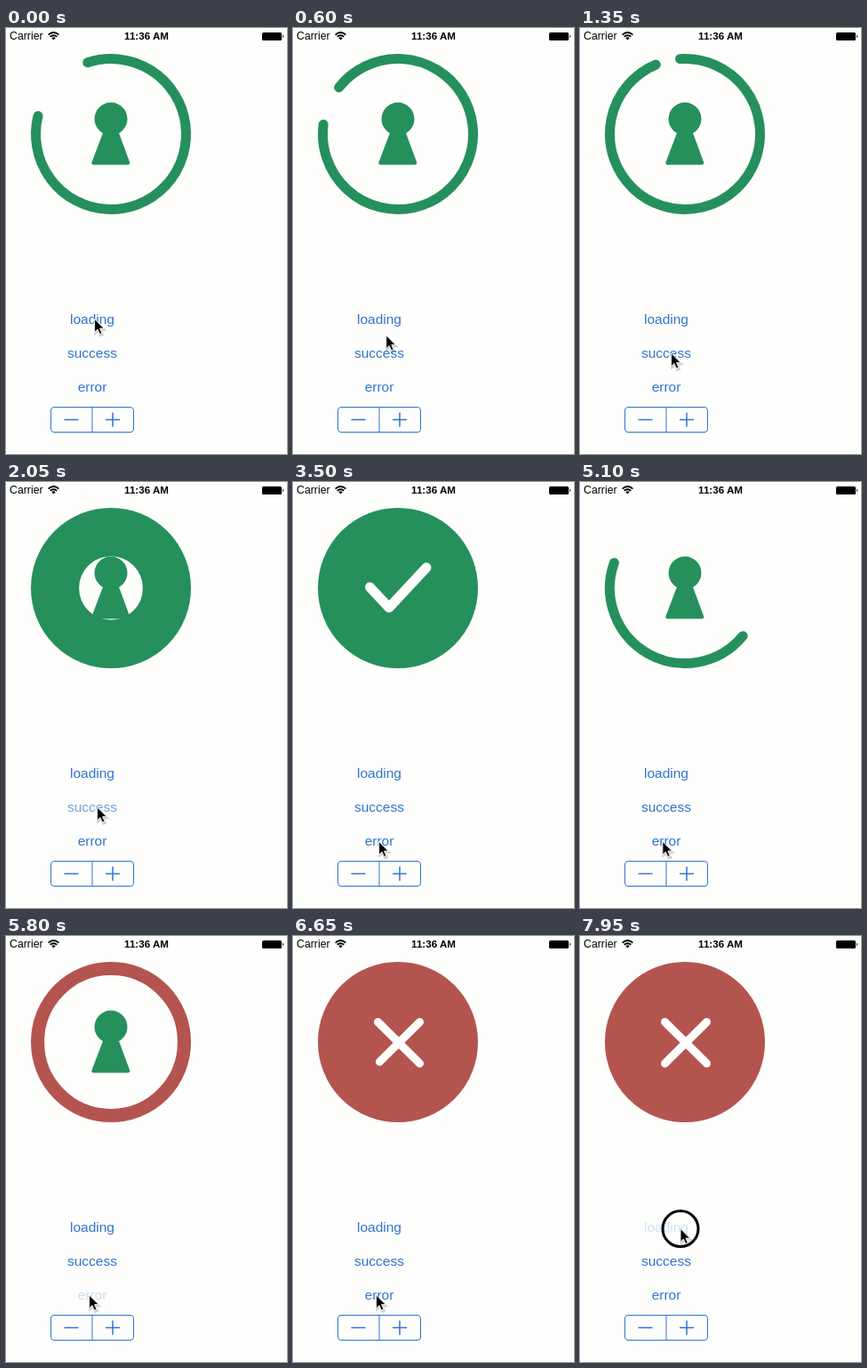
Write an HTML page that moves like this. It is 316 by 478 pixels and loops after 8 s.

```html
<!DOCTYPE html>
<html>
<head>
<meta charset="utf-8">
<style>
  html, body { margin: 0; width: 100%; height: 100%; overflow: hidden; background: #fefefc; }
  svg { display: block; width: 100vw; height: 100vh; }
  text { font-family: "Liberation Sans", Arial, sans-serif; }
  .button { font-size: 15.5px; fill: #2e74cf; text-anchor: middle; }
  .line { fill: none; stroke-linecap: round; stroke-linejoin: round; }
</style>
</head>
<body>
<svg viewBox="0 0 316 478">
  <rect width="316" height="478" fill="#fefefc"/>

  <text x="4" y="13" font-size="12.3" fill="#000">Carrier</text>
  <path d="M47.6 7.6Q53.5 2.4 59.4 7.6M49.7 9.8Q53.5 6.6 57.3 9.8" fill="none" stroke="#000" stroke-width="1.8"/>
  <path d="M51.3 11.2Q53.5 9.5 55.7 11.2L53.5 13.4Z"/>
  <text x="158" y="13" font-size="11.6" font-weight="bold" fill="#000" text-anchor="middle">11:36 AM</text>
  <rect x="288" y="5" width="22" height="9" rx="1.5"/>
  <path d="M311 7.6Q313 9.5 311 11.2Z"/>

  <g id="keyhole" fill="#25905c">
    <circle cx="118" cy="102" r="18.5"/>
    <path d="M112.2 115H123.8L137.3 151.4H98.3Z" stroke="#25905c" stroke-width="4" stroke-linejoin="round"/>
  </g>
  <path id="arc" class="line" stroke="#25905c" stroke-width="11"/>
  <circle id="fill" cx="118" cy="119" fill="none"/>
  <g class="line" stroke="#fefefc">
    <path id="check" d="M86.5 118L108 141L150 96" stroke-width="11" pathLength="1"/>
    <path id="cross1" d="M95.5 96.5L142.5 143" stroke-width="9" pathLength="1"/>
    <path id="cross2" d="M142.5 96.5L95.5 143" stroke-width="9" pathLength="1"/>
  </g>

  <text id="loading" class="button" x="97" y="332">loading</text>
  <text id="success" class="button" x="97" y="370">success</text>
  <text id="error" class="button" x="97" y="408">error</text>
  <g fill="none" stroke="#2e74cf">
    <rect x="50.5" y="425.5" width="93" height="28" rx="3.5"/>
    <path d="M97 425.5V453.5"/>
    <path d="M65.5 439.5H81.5M112 439.5H128M120 431.5V447.5" stroke-width="1.5"/>
  </g>

  <circle id="touch" r="20" fill="none" stroke="#000" stroke-width="3"/>
  <g id="cursor">
    <path d="M0 0V15.2L3.6 11.9L6.2 17.6L8.8 16.4L6.3 10.9H11Z" transform="translate(.6 1.4)" opacity=".18" stroke="#000" stroke-width="2"/>
    <path d="M0 0V14.8L3.4 11.6L5.9 17L8.3 15.9L6 10.6H10.6Z" stroke="#fff" stroke-width=".9"/>
  </g>
</svg>
<script>
  const LOOP = 8;
  const GREEN = "#25905c", RED = "#b4544f";
  const CX = 118, CY = 119, R = 84.5;
  const FILL_TIME = 0.5, MARK_TIME = 0.4, FADE = 0.47;

  // Button presses: name, time down, time up
  const presses = [
    ["success", 1.64, 1.778],
    ["loading", 4.06, 4.201],
    ["error", 5.62, 5.775],
    ["loading", 7.85, 8.1]
  ];
  // Pointer stops: time, x, y
  const stops = [
    [0, 99.6, 326.5], [0.6, 104.8, 345], [1.0, 102.6, 365], [2.1, 102.6, 365],
    [2.5, 96.6, 403.5], [3.5, 96.6, 403.5], [3.95, 100, 327], [4.3, 100, 327],
    [4.9, 92.8, 403.5], [5.8, 93.6, 403], [6.9, 93.6, 403], [7.5, 96, 384],
    [7.7, 96, 384], [7.85, 113, 328.5], [8, 113, 328.5]
  ];
  // Loader sweep in degrees by its age in seconds
  const sweeps = [[0, 1], [0.9, 160], [1.951, 302], [2.551, 329], [4, 352]];

  const el = {};
  document.querySelectorAll("[id]").forEach(e => el[e.id] = e);

  const clamp = v => Math.min(1, Math.max(0, v));
  const smooth = v => v * v * (3 - 2 * v);
  const show = (e, on) => e.style.display = on ? "" : "none";

  function track(points, t, col, ease = v => v) {
    let i = 1;
    while (i < points.length - 1 && t > points[i][0]) i++;
    const a = points[i - 1], b = points[i];
    return a[col] + (b[col] - a[col]) * ease(clamp((t - a[0]) / (b[0] - a[0])));
  }

  function drawLoader(age) {
    const start = -90 + 544 * age;
    const sweep = track(sweeps, age, 1);
    const point = deg => {
      const a = deg * Math.PI / 180;
      return `${(CX + R * Math.cos(a)).toFixed(2)} ${(CY + R * Math.sin(a)).toFixed(2)}`;
    };
    el.arc.setAttribute("d",
      `M${point(start)}A${R} ${R} 0 ${sweep > 180 ? 1 : 0} 1 ${point(start + sweep)}`);
  }

  function drawFill(age, color) {
    const width = 11 + 79 * clamp(age / FILL_TIME);
    el.fill.setAttribute("r", 90 - width / 2);
    el.fill.setAttribute("stroke-width", width);
    el.fill.setAttribute("stroke", color);
  }

  function drawMark(e, amount) {
    show(e, amount > 0);
    e.style.strokeDasharray = amount < 1 ? `${amount} 2` : "none";
  }

  function render(t) {
    const success = t >= 1.778 && t < 4.201;
    const error = t >= 5.775;
    const loading = !success && !error;
    const age = t - (error ? 5.775 : 1.778);

    show(el.arc, loading);
    show(el.fill, !loading);
    show(el.keyhole, loading || age < FILL_TIME);
    if (loading) drawLoader(t < 1.778 ? t + 1.951 : t - 4.201);
    else drawFill(age, error ? RED : GREEN);

    const mark = (on, delay, time) =>
      on ? smooth(clamp((age - FILL_TIME - delay) / time)) : 0;
    drawMark(el.check, mark(success, 0, MARK_TIME));
    drawMark(el.cross1, mark(error, 0, MARK_TIME / 2));
    drawMark(el.cross2, mark(error, MARK_TIME / 2, MARK_TIME / 2));

    const alpha = { loading: 1, success: 1, error: 1 };
    let touched = false;
    for (const [name, down, up] of presses) {
      if (t < down) continue;
      if (t < up) touched = true;
      alpha[name] = 0.2 + 0.8 * clamp((t - up) / FADE);
    }
    for (const name in alpha) el[name].setAttribute("opacity", alpha[name]);

    const x = track(stops, t, 1, smooth), y = track(stops, t, 2, smooth);
    el.cursor.setAttribute("transform", `translate(${x} ${y})`);
    el.touch.setAttribute("transform", `translate(${x} ${y})`);
    show(el.touch, touched);
  }

  const begin = performance.now();
  function tick() {
    render((performance.now() - begin) / 1000 % LOOP);
    requestAnimationFrame(tick);
  }
  tick();
</script>
</body>
</html>
```
